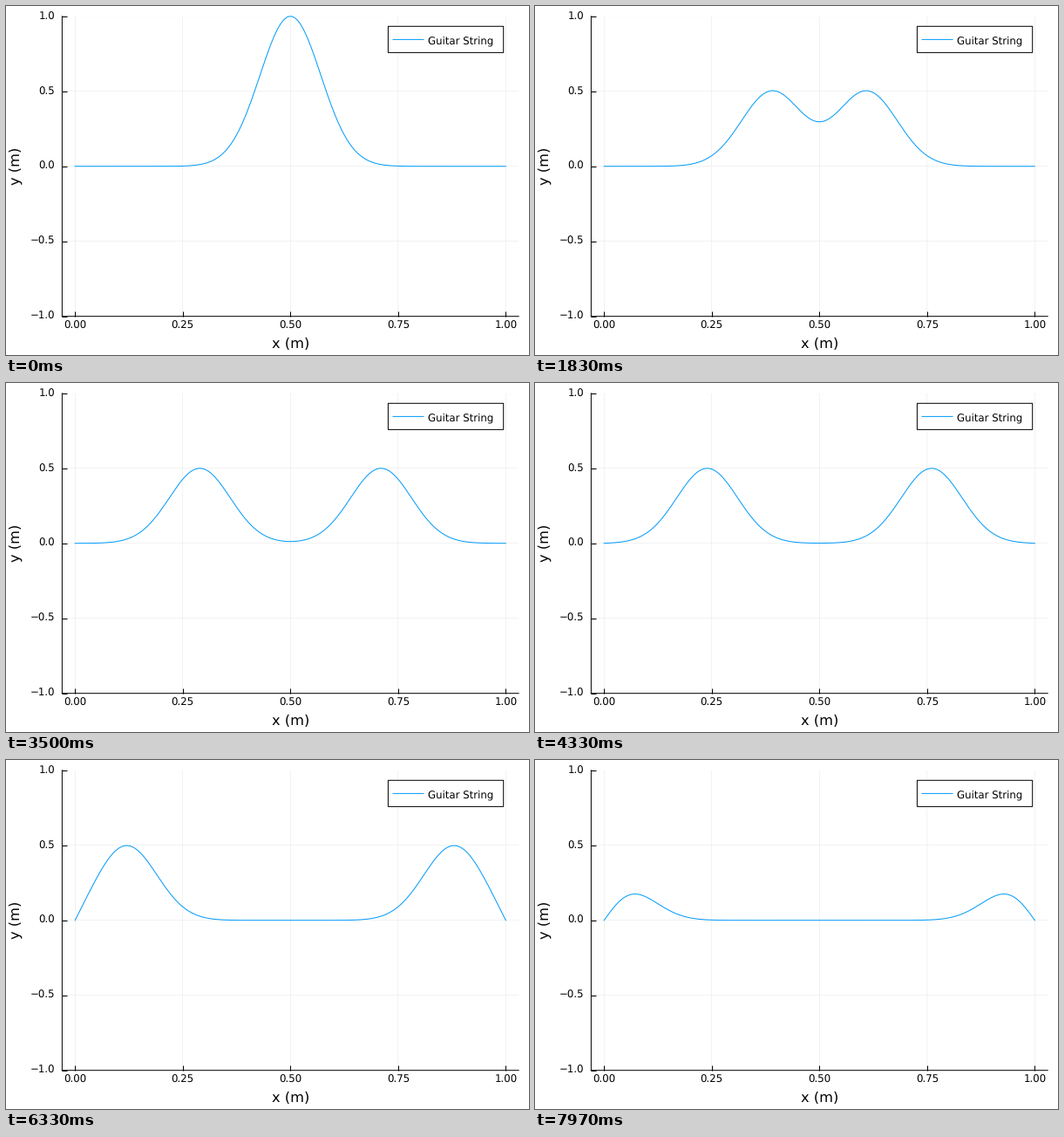
Write a matplotlib script that moves like this. It is 600x400 px and loops after 8000 ms.

```python
import numpy as np
import matplotlib.pyplot as plt
from matplotlib.animation import FuncAnimation
from matplotlib.lines import Line2D
from matplotlib.patches import Rectangle
from matplotlib.transforms import Affine2D

W, H, DPI = 600, 400, 100
FRAMES, INTERVAL = 400, 20  # 8 s loop
STEPS_PER_MS = 0.03         # the string is advanced 30 times a second
LEAD_MS = 15                # centres each step on the 20 ms frame grid
POINTS = 500
BLUE = "#009afa"
LEFT, RIGHT, TOP, BOTTOM = 64.4, 588.19, 11.81, 355.7
PX = 72 / DPI               # points per pixel
SMALL, LARGE = 11.8 * PX, 16.2 * PX

plt.rcParams.update({"font.family": "DejaVu Sans", "path.snap": False,
                     "text.hinting": "none"})

fig = plt.figure(figsize=(W / DPI, H / DPI), dpi=DPI, facecolor="white")
ax = fig.add_axes([LEFT / W, 1 - BOTTOM / H, (RIGHT - LEFT) / W, (BOTTOM - TOP) / H])
# Stage pixels with the origin at the top left
stage = Affine2D().scale(1 / W, -1 / H).translate(0, 1) + fig.transFigure


def label(x, y, text, size, **kw):
    fig.text(x, y, text, size=size, transform=stage, va="baseline",
             rotation_mode="anchor", **kw)


def bump(u):
    return np.exp(-100 * u**2)


def string_shape(shift):
    """Two half-height pulses moving apart, inverted at the fixed ends."""
    outgoing = bump(x - 0.5 - shift) + bump(x - 0.5 + shift)
    reflected = bump(x - 1.5 + shift) + bump(x + 0.5 - shift)
    return (outgoing - reflected) / 2


# Axes
ax.set_xlim(-0.03, 1.03)
ax.set_ylim(-1, 1)
ax.set_xticks(np.linspace(0, 1, 5))
ax.set_yticks(np.linspace(-1, 1, 5))
ax.xaxis.set_major_formatter("{x:.2f}")
ax.yaxis.set_major_formatter("{x:.1f}")
ax.set_axisbelow(True)
ax.grid(color="black", alpha=0.1, linewidth=0.5 * PX)
ax.tick_params(direction="in", length=6 * PX, width=PX, labelsize=SMALL)
ax.tick_params(axis="x", pad=5 * PX)
ax.tick_params(axis="y", pad=8.3 * PX)
for text in ax.get_yticklabels():
    text.set_transform(text.get_transform() + Affine2D().translate(0, 1))
for side, spine in ax.spines.items():
    spine.set_linewidth(PX)
    spine.set_visible(side in ("left", "bottom"))

label(326.4, 392, "x (m)", LARGE, ha="center")
label(16, 183.8, "y (m)", LARGE, ha="center", rotation=90)

# Legend
fig.add_artist(Rectangle((438.4, 23.3), 132.3, 30.1, transform=stage, facecolor="white",
                         edgecolor="black", linewidth=PX, zorder=3))
fig.add_artist(Line2D([444, 479], [38.4, 38.4], transform=stage, color=BLUE,
                      linewidth=PX, zorder=4))
label(484.3, 43, "Guitar String", SMALL, zorder=4)

x = np.linspace(0, 1, POINTS)
dx = x[1]
curve, = ax.plot(x, string_shape(0), color=BLUE, linewidth=PX, clip_on=False, zorder=3)


def draw(i):
    step = int((i * INTERVAL + LEAD_MS) * STEPS_PER_MS)
    curve.set_ydata(string_shape(step * dx))
    return curve,


anim = FuncAnimation(fig, draw, frames=FRAMES, interval=INTERVAL,
                     repeat=True, repeat_delay=0)
plt.show()
```
